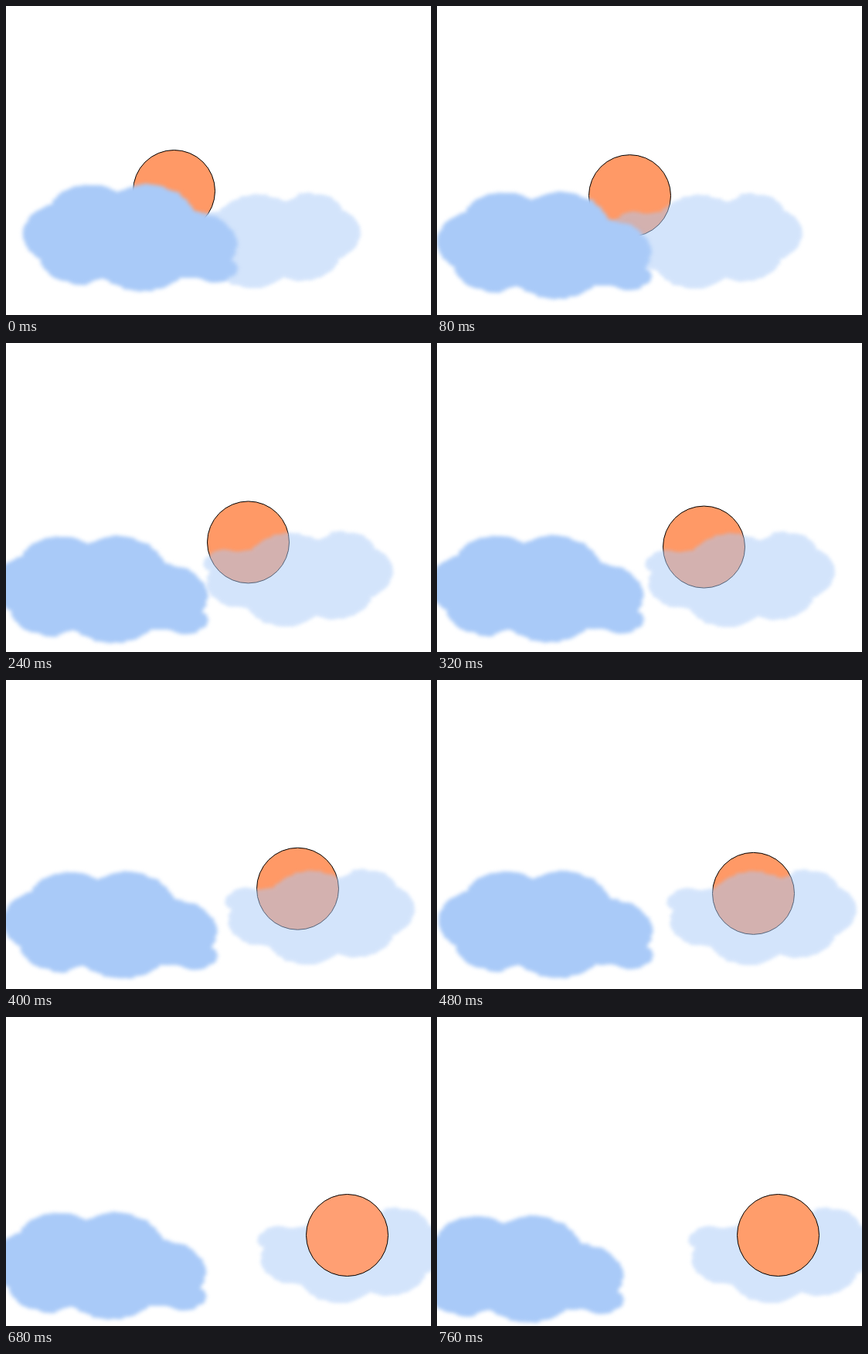
Animation of 550x400 px, one loop 0.8 s. Source, as an HTML page:

```html
<!DOCTYPE html>
<html lang="en">
<head>
<meta charset="utf-8">
<title>Sun and clouds</title>
<style>
  html, body { margin: 0; width: 100%; height: 100%; overflow: hidden; background: #fff; }
  svg { display: block; }
</style>
</head>
<body>
<svg width="550" height="400" viewBox="0 0 550 400">
  <defs>
    <filter id="brush" x="-10%" y="-10%" width="120%" height="120%" color-interpolation-filters="sRGB">
      <feTurbulence type="fractalNoise" baseFrequency=".03 .22" numOctaves="2" seed="4"/>
      <feDisplacementMap in="SourceGraphic" scale="7" xChannelSelector="R" yChannelSelector="G"/>
      <feGaussianBlur stdDeviation="2.6"/>
    </filter>
    <g id="cloud" fill="#a9caf8" filter="url(#brush)">
      <ellipse cx="-85" cy="-5" rx="54" ry="40"/>
      <ellipse cx="-54" cy="-28" rx="52" ry="41"/>
      <ellipse cx="22" cy="-20" rx="62" ry="49"/>
      <ellipse cx="73" cy="9" rx="65" ry="43"/>
      <ellipse cx="108" cy="40" rx="31" ry="17"/>
      <ellipse cx="15" cy="30" rx="60" ry="39"/>
      <ellipse cx="-68" cy="20" rx="50" ry="40"/>
    </g>
  </defs>
  <circle id="sun" r="53" stroke="#000"/>
  <g id="pale" opacity=".5"><use href="#cloud" transform="rotate(172) scale(.87)"/></g>
  <g id="front"><use href="#cloud"/></g>
</svg>
<script>
const FRAME = 40, FRAMES = 20;
const sun = document.getElementById('sun');
const pale = document.getElementById('pale');
const front = document.getElementById('front');

const lerp = (a, b, t) => a + (b - a) * t;
const progress = (from, to, frame) => Math.min(1, Math.max(0, (frame - from) / (to - from)));

const moveTo = (node, x, y) => node.setAttribute('transform', `translate(${x} ${y})`);

// The front cloud drops left, drifts back to the right, then drops left again.
function placeFront(frame) {
  const drop = progress(0, 4, frame);
  const drift = progress(4, 14, frame);
  const leave = progress(14, 19, frame);
  moveTo(front, 161 - 44 * drop + 30 * drift - 44 * leave, 300 + 20 * drop - 4.5 * drift + 11 * leave);
}

function draw(ms) {
  const frame = Math.floor(ms / FRAME) % FRAMES;
  const rise = progress(0, 14, frame);
  const drift = progress(0, 16, frame);
  moveTo(sun, lerp(217.5, 441.5, rise), lerp(239.5, 282.5, rise));
  moveTo(pale, lerp(338, 450, drift), lerp(302.5, 307.5, drift));
  placeFront(frame);

  // At the end the sun passes in front of the pale cloud, briefly lighter.
  if (frame > 14) {
    const t = progress(15, 19, frame);
    pale.after(sun);
    sun.setAttribute('fill', `rgb(255 ${lerp(161, 157, t)} ${lerp(123, 107, t)})`);
  } else {
    pale.before(sun);
    sun.setAttribute('fill', '#f96');
  }
}

const start = performance.now();
function tick() {
  draw(performance.now() - start);
  requestAnimationFrame(tick);
}
tick();
</script>
</body>
</html>
```
